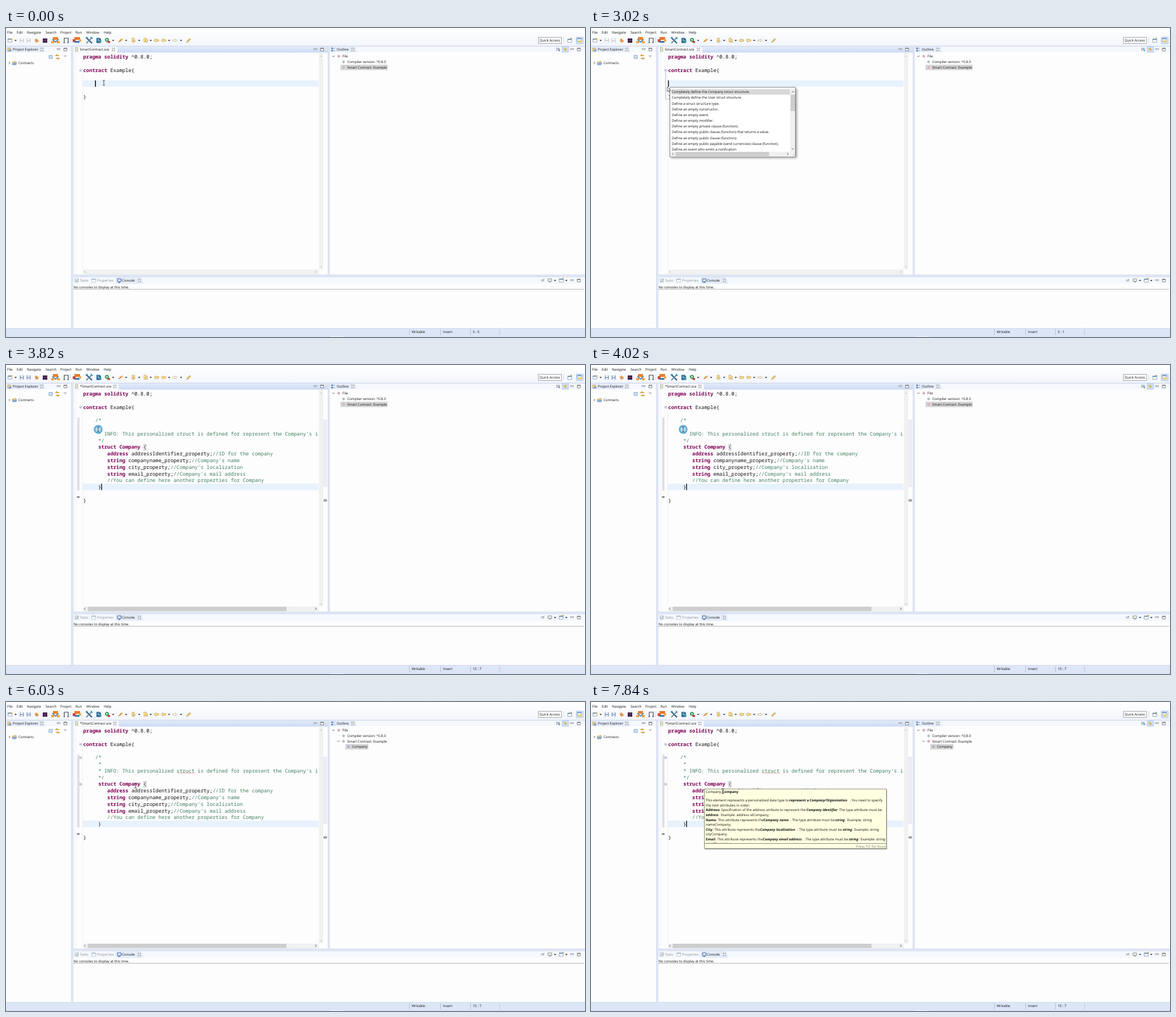
Write an HTML page that moves like this. It is 1024 px wide and 547 px high and loops after 8 s.

```html
<!DOCTYPE html>
<html lang="en">
<head>
<meta charset="utf-8">
<title>Contract editor</title>
<style>
html, body { margin: 0; width: 100%; height: 100%; overflow: hidden; background: #fdfdfd; }
svg { display: block; width: 100vw; height: 100vh; }
text { font: 6.08px "Open Sans", "Noto Sans", sans-serif; fill: #111; white-space: pre; text-rendering: geometricPrecision; }
.code { font: 8.88px "Noto Sans Mono", "DejaVu Sans Mono", monospace; }
.k { font-weight: 700; fill: #7f0055; }
.c { fill: #3f7f5f; }
.b { font-weight: 700; }
.i { font-weight: 700; font-style: italic; }
.grey, .grey text { fill: #8c8f96; }
.ln { fill: none; stroke: #555; stroke-width: .9; }
[data-on] { animation: 8s step-end infinite; }
#ibeam, #arrow { animation: 8s step-end infinite; }
#ibeam { animation-name: beam; }
#arrow { animation-name: point; }
@keyframes beam {
  0% { transform: translate(173px, 97px); }
  17.625% { transform: translate(164px, 98px); }
  20.125% { transform: translate(146px, 98px); }
  22.625% { transform: translate(138px, 99px); }
  47.75% { transform: translate(163px, 114px); }
  55.375% { transform: translate(196px, 131px); }
  57.875% { transform: translate(224px, 148px); }
  60.375% { transform: translate(231px, 148px); }
  75.375% { transform: translate(229px, 148px); }
  95.5% { transform: translate(231px, 153px); }
  98% { transform: translate(233px, 158px); }
}
@keyframes point {
  0% { transform: translate(135px, 104px); }
  40.25% { transform: translate(148px, 108px); }
  42.75% { transform: translate(162px, 113px); }
}
</style>
</head>
<body>
<svg viewBox="0 0 1024 547" preserveAspectRatio="none">
<defs>
  <linearGradient id="bar" x2="0" y2="1"><stop stop-color="#fff"/><stop offset="1" stop-color="#f3f6fc"/></linearGradient>
  <linearGradient id="head" x2="0" y2="1"><stop stop-color="#e3ebfa"/><stop offset="1" stop-color="#cbdaf4"/></linearGradient>
  <filter id="blur" x="-10%" y="-10%" width="120%" height="120%"><feGaussianBlur stdDeviation="2"/></filter>
  <clipPath id="page"><path d="M119 43H552.5V427H119z"/></clipPath>
  <clipPath id="list"><path d="M140 106H352V218.5H140z"/></clipPath>
  <clipPath id="note"><path d="M200 154H522V250H200z"/></clipPath>
  <path id="dd" d="M-2-1H2L0 1.4z" fill="#333"/>
  <path id="min" d="M-2.7-1.6H2.7V.2H-2.7z" fill="#fff" stroke="#777" stroke-width=".7"/>
  <path id="max" d="M-2.7-2.5H2.7V2.5H-2.7zM-2.7-1.4H2.7" fill="#fff" stroke="#666" stroke-width=".8"/>
  <path id="close" d="M-2.6-2.6H-1L0-1 1-2.6H2.6V-1.6L1 0 2.6 1.6V2.6H1L0 1-1 2.6H-2.6V1.6L-1 0-2.6-1.6z" fill="#fff" stroke="#777" stroke-width=".6"/>
  <path id="gem" d="M0-3L3 0 0 3-3 0zM-1.2 0H1.2M0-1.2V1.2" stroke="#fff" stroke-width=".6"/>
  <path id="open" class="ln" d="M-2-1L0 1 2-1"/>
  <g id="fold"><circle r="2.2" fill="#eef2f7" stroke="#9aa9b8" stroke-width=".6"/><path d="M-1.2 0H1.2" stroke="#56708a" stroke-width=".7"/></g>
  <g id="disk"><path d="M-3.6-3.6H3.6V3.6H-3.6z" fill="currentColor"/><path d="M-2-3.6H2V-.8H-2zM-1.6 1H1.6V3.6H-1.6z" fill="#fff"/></g>
  <g id="win"><path d="M-3.6-3H3.6V3H-3.6z" fill="#fdfdfa" stroke="#8296ad" stroke-width=".8"/><path d="M-3.6-3H3.6V-1.3H-3.6z" fill="#6e93c0"/></g>
  <path id="back" d="M-4.2 0L-.8-3V-1.4H4V1.4H-.8V3z" stroke-width=".7"/>
</defs>

<!-- window frame -->
<path fill="#e1e8f7" d="M0 0H1024V547H0z"/>
<path fill="url(#bar)" d="M0 0H1024V31H0z"/>
<g id="menu"></g>

<!-- toolbar -->
<g id="tools">
  <use href="#win" x="7" y="22"/><circle cx="10" cy="19.5" r="1.5" fill="#e8b93c"/>
  <g data-on="0 3820" color="#d0d1d3"><use href="#disk" x="28" y="22"/><use href="#disk" x="40" y="22"/></g>
  <g data-on="3820" color="#8ba3c4"><use href="#disk" x="28" y="22"/><use href="#disk" x="40" y="22"/></g>
  <path d="M51 20L54 18.5 58.5 23 55 26z" fill="#e7a04d"/><path d="M51 20L55 26 52 24z" fill="#b85c2c"/>
  <path d="M65 18.5H73V26H65z" fill="#3b1546"/><path d="M65 22H73M69 18.5V26" stroke="#86628d" stroke-width=".6"/>
  <path d="M83 16H92V21H83z" fill="#e9812c"/><path d="M80 23H85V27H80zM90 23H95V27H90z" fill="#f0a13f"/><path d="M82 20L87.5 25 93 20" fill="none" stroke="#3a6e9c" stroke-width="1.6"/>
  <path d="M103 26V18H110V26M101.5 26H104.5M108 26H111" fill="none" stroke="#39424e" stroke-width="1.2"/>
  <path d="M121 16H131V21H121z" fill="#ea792b"/><path d="M118 20H123V25H118z" fill="#d9422e"/><path d="M121 24.5H130" stroke="#3b75ac" stroke-width="3"/><path d="M129 20H133V24H129z" fill="#f0a642"/>
  <path d="M142 17L152 27" stroke="#315f89" stroke-width="2.4"/><path d="M152 17L142 27" stroke="#718a9b" stroke-width="2"/><path d="M141 18L144 16M150 16L153 19" stroke="#2c9bc4" stroke-width="2"/>
  <path d="M160 17.5H166L168 20V26.5H160z" fill="#23658f"/><path d="M161.5 20H165M161.5 22.5H166" stroke="#d4eef6" stroke-width="1"/><circle cx="167" cy="24" r="2" fill="#39a3a0"/>
  <circle cx="178.5" cy="21" r="3.5" fill="#339b54"/><path d="M177.5 19L180.5 21 177.5 23z" fill="#fff"/><path d="M179.5 23H184V26.5H179.5z" fill="#b84939"/>
  <path d="M199 25L202 20 206 18.5 207 20 203 24z" fill="#efb05a"/><path d="M199 25L203 21" stroke="#a66532"/>
  <g fill="#fae4a0" stroke="#bd953c" stroke-width=".7"><path d="M223 18H227V25H223zM244 18H248V25H244z"/><path d="M225 21L229 23 225 26zM246 23L250 20V26z"/></g>
  <g fill="#fce69b" stroke="#bf8e2c"><use href="#back" x="266" y="22"/><use href="#back" x="278.500" y="22"/></g>
  <use href="#back" transform="translate(299 22) scale(-1 1)" fill="#f5f0dc" stroke="#c9bd94"/>
  <path d="M319 26L321 22 325 18.5 326.500 20 323 24z" fill="#eac454" stroke="#9a8050" stroke-width=".5"/>
  <path d="M114.500 17V27M986.500 17V27" stroke="#b3b8c3" stroke-width=".9" stroke-dasharray="1 1"/>
  <path d="M941.500 16.500H982.500V27.500H941.500z" fill="#fff" stroke="#8d8d8d" stroke-width=".8"/>
  <text x="943.500" y="24.200" fill="#555">Quick Access</text>
  <use href="#win" x="997" y="22.500"/><path d="M998 18.500H1001M999.500 17V20" stroke="#d6a43b"/>
  <path d="M1008.500 16H1021V28H1008.500z" fill="#cfe2f9" stroke="#a4c2e5" stroke-width=".7"/>
  <use href="#win" x="1014" y="21"/><path d="M1012 22H1018V26H1012z" fill="#f0cd70"/>
</g>

<!-- panes -->
<g fill="#fdfdfd" stroke="#ccd5e8" stroke-width=".8">
  <path d="M-1 32.500H115.500V531.500H-1zM118.500 32.500H569.500V437H118.500zM572 32.500H1025V437H572zM118.500 440.500H1025V531.500H118.500z"/>
</g>
<path fill="#f5f8fd" d="M0 33H115V43H0zM572.500 33H1024V43H572.500zM119 441H1024V453H119z"/>
<path fill="#e5edfa" d="M0 33H66L69 43H0zM573 33H617L621 43H573zM194 441H238L243 453H194z"/>
<path fill="url(#head)" d="M119 33H569V43.500H119z"/>
<path data-on="0 3820" d="M119 33H194L197 35V43.500H119z" fill="#fafbfe"/>
<path data-on="3820" d="M119 33H196.500L199.500 35V43.500H119z" fill="#fafbfe"/>

<!-- project tree -->
<path d="M3 35.500H8V41H3z" fill="#f3d281" stroke="#9a8955" stroke-width=".6"/><path d="M5 38H9.500V41.500H5z" fill="#7fa3d3"/>
<text x="12" y="40.200">Project Explorer</text>
<path d="M76 48.500H82V54H76zM77.500 51.200H80.500" fill="#eaf3fd" stroke="#5689bd" stroke-width=".8"/>
<path d="M87 49.500L90 47.500V49H94M95 53L92 55V53.500H88" fill="none" stroke="#c9972f" stroke-width="1.500"/>
<path d="M102.500 49H107L104.700 51.500z" fill="#fff" stroke="#777" stroke-width=".6"/>
<path class="ln" d="M5 60L7 62 5 64"/>
<path d="M11 60H14L15 59H18V65H11z" fill="#f1ce77" stroke="#ad8b43" stroke-width=".5"/><path d="M12.500 61.500H19.500L18 65.500H11z" fill="#79a9dd"/>
<text x="22" y="64.200">Contracts</text>

<!-- outline -->
<path d="M575.500 35H578V37H575.500zM575.500 39H578V41H575.500zM579 36H582M579 40H582" fill="#5b84c2" stroke="#5b84c2" stroke-width=".7"/>
<text x="585" y="40.200">Outline</text>
<path d="M973 36H976M973 39H976M978 35V41L980 39" class="ln"/><path d="M976 37L980 40" stroke="#3d75ba"/>
<path d="M983.500 32.500H995V43H983.500z" fill="#cbdffa" stroke="#9fbfe7" stroke-width=".6"/><path d="M986 36L989 35 992 39 989 41z" fill="#e5b445"/>
<use href="#open" x="579" y="50"/><use href="#gem" x="588.500" y="50" fill="#c38798"/><text x="595" y="52.200">File</text>
<use href="#gem" x="597" y="60" fill="#8da99a"/><text x="603.500" y="62.200">Compiler version: ^0.8.0</text>
<path data-on="0 4430" fill="#d5d5d5" d="M591.500 65H675V74.500H591.500z"/>
<use href="#gem" x="597" y="69.500" fill="#b88f9d"/><text x="603.500" y="71.800">Smart Contract: Example</text>
<g data-on="4430">
  <use href="#open" x="588" y="69.500"/><path fill="#d5d5d5" d="M600 74.500H641V84H600z"/>
  <use href="#gem" x="605.500" y="79" fill="#7e82a8"/><text x="612" y="81.300">Company</text>
</g>

<!-- console -->
<g class="grey">
  <path d="M122 444H128V450H122z" fill="#e4ebf2" stroke="#a0aec0" stroke-width=".7"/><path d="M123 447L125 449 128 444" fill="none" stroke="#8dab91"/>
  <text x="130.500" y="449.200">Tasks</text>
  <use href="#win" x="155" y="447" opacity=".6"/><text x="161" y="449.200">Properties</text>
</g>
<path d="M197 444H203.500V449H197zM198.500 450.500H202" fill="#dbe8fa" stroke="#3f61a0"/><text x="205" y="449.200">Console</text>
<text x="119.500" y="461">No consoles to display at this time.</text>
<path d="M119 462.500H1022" stroke="#a2a2a2" stroke-width=".8"/>
<path d="M946 445H952V449H946z" fill="#c9d1d8"/><path d="M949 447L952 444" stroke="#7f9286"/>
<path d="M958.500 444H965V448.500H958.500zM960 450H964" fill="#edf2d9" stroke="#707a83" stroke-width=".8"/>
<use href="#win" x="982" y="447"/><path d="M984 443.500H987M985.500 442V445" stroke="#d4a443"/>

<!-- status -->
<path fill="#dce6f7" d="M0 532H1024V547H0z"/>
<path fill="#cfdfe9" d="M0 546H1024V547H0z"/><path fill="#f4f8fd" d="M573 546H598V547H573z"/>
<path d="M713.500 533V544M768.500 533V544M821.500 533V544" stroke="#a9b3c5" stroke-width=".8"/>
<path d="M873 534V544" stroke="#b69b86" stroke-width="1" stroke-dasharray="1 1.200"/>
<text x="717.500" y="540.200">Writable</text><text x="773" y="540.200">Insert</text>
<text x="825.500" y="540.200" data-on="0 1810">5 : 5</text>
<text x="825.500" y="540.200" data-on="1810 3820">5 : 1</text>
<text x="825.500" y="540.200" data-on="3820">15 : 7</text>

<!-- editor -->
<path d="M122.500 34.500H127V41.500H122.500z" fill="#fff9dd" stroke="#8c9c88" stroke-width=".7"/><path d="M123.500 37H126M123.500 39H126" stroke="#779d70" stroke-width=".7"/>
<g data-on="0 3820"><text x="130.500" y="40.200">SmartContract.sce</text><use href="#close" x="190" y="38"/></g>
<g data-on="3820"><text x="131" y="40.200">*SmartContract.sce</text><use href="#close" x="192.500" y="38"/></g>
<path d="M119 43.500H125V436H119z" fill="#f8f9fb"/>
<path d="M135.500 44V427" stroke="#ececf0" stroke-width=".8"/>
<path d="M553.500 44H561V427H553.500zM136 427.500H553V436H136z" fill="#f1f1f1"/>
<path d="M555 51L557 49 559 51M555 422L557 424 559 422" class="ln" style="stroke:#bbb"/>
<path d="M140.500 429.500L138.500 431.500 140.500 433.500M547 429.500L549 431.500 547 433.500" class="ln" style="stroke:#aaa"/>
<g data-on="3820">
  <path d="M144.500 428H496V435.500H144.500z" fill="#cdcdcd"/>
  <path d="M140.500 429.500L138.500 431.500 140.500 433.500M547 429.500L549 431.500 547 433.500" class="ln"/>
  <path d="M126 93H130V222H126z" fill="#dedee8"/><path d="M125.500 233.700H130" stroke="#111" stroke-width="1.300"/>
  <path d="M562 97.500H567V215H562z" fill="#f0f0fa" stroke="#d6d6e8" stroke-width=".7"/>
  <path d="M562.300 238.500H567V241H562.300z" fill="#dde" stroke="#444" stroke-width=".8"/>
  <path d="M136 210H552.500V221.600H136z" fill="#e8f2fe"/>
  <path d="M243.300 140.500H248V151H243.300z" fill="none" stroke="#b5b5b5" stroke-width=".8"/>
</g>
<path data-on="0 3820" d="M136 92.700H552.500V104H136z" fill="#e8f2fe"/>
<use href="#fold" x="132" y="75"/>
<g data-on="4430"><use href="#fold" x="132" y="98.500"/><use href="#fold" x="132" y="145.500"/></g>
<path data-on="2820 3220" d="M132 77.500V126H135" fill="none" stroke="#8f9fb0" stroke-width=".8"/>
<g id="top"></g>
<g id="plain" data-on="0 3820"></g>
<g id="filled" data-on="3820" clip-path="url(#page)"></g>
<path data-on="4430" d="M302.500 126q1-1.600 2 0t2 0 2 0 2 0 2 0 2 0 2 0 2 0 2 0 2 0 2 0 2 0 2 0 2 0 2 0 2 0" fill="none" stroke="#e07a68" stroke-width=".7"/>
<g fill="#000">
  <path data-on="0 810 1210 1810" d="M157.500 92.700H159V104H157.500z"/>
  <path data-on="1810 2410 2820 3620" d="M136.300 92.700H137.700V104H136.300z"/>
  <path data-on="3820 4830 5430 6030 6430 7040 7640" d="M168.300 210.200H169.700V221.500H168.300z"/>
</g>

<!-- proposals -->
<g data-on="2820 3820">
  <path d="M141 107H364V230H141z" opacity=".4" filter="url(#blur)"/>
  <path d="M139.500 105H361.500V228H139.500z" fill="#fff" stroke="#777" stroke-width=".9"/>
  <path d="M142 108.300H352V118H142z" fill="#d9d9d9"/>
  <g data-on="3620"><path d="M142 108.300H352V118H142z" fill="#cce8ff"/><path d="M142.300 108.500H284V117.800H142.300z" fill="none" stroke="#5e8fb5" stroke-width=".8"/></g>
  <g id="items" clip-path="url(#list)"></g>
  <path d="M352.500 108H361V219H352.500zM140 219H361V227.500H140z" fill="#f0f0f0"/>
  <path d="M353 118H361V147H353zM149.500 219.500H315V227H149.500z" fill="#cdcdcd"/>
  <path d="M355 114L357 112 359 114M355 213L357 215 359 213M145.500 221L143.500 223 145.500 225M347 221L349 223 347 225" class="ln"/>
  <path d="M360 222L356 226M360 225L359 226" stroke="#bbb" stroke-width=".7"/>
</g>

<!-- hover note -->
<g data-on="6430">
  <path d="M202 156H523.500V261H202z" opacity=".35"/>
  <path d="M200.500 154H522.500V259.500H200.500zM200.500 250.500H522.500" fill="#ffffe1" stroke="#6d6d60" stroke-width=".8"/>
  <g id="tip" clip-path="url(#note)"></g>
  <text x="521.500" y="258" text-anchor="end" style="fill:#777">Press 'F2' for focus</text>
</g>

<!-- pointers -->
<g data-on="0 2820 3820"><g id="ibeam">
  <g data-on="3820 4220"><circle r="6.700" fill="#8cc6e8" stroke="#5aa7d6" stroke-width="2"/><circle r="4" fill="#b9dff2"/></g>
  <path d="M-2-4.200H-.6L0-3.700.6-4.200H2M0-3.700V3.700M-2 4.200H-.6L0 3.700.6 4.200H2" fill="none" stroke="#333" stroke-width=".9"/>
</g></g>
<g data-on="2820 3820"><path id="arrow" d="M0 0V8.500L2 6.700 3.400 9.700 4.800 9 3.500 6.200H6z" fill="#fff" stroke="#222" stroke-width=".7"/></g>
</svg>
<script>
const LOOP = 8000;
const $ = id => document.getElementById(id);
const add = (id, html) => $(id).insertAdjacentHTML('beforeend', html);
const text = (x, y, s, cls = '') => `<text x="${x}" y="${y}" class="${cls}">${s}</text>`;
const use = (id, x, y) => `<use href="#${id}" x="${x}" y="${y}"/>`;

// Menu bar: dimmed while the proposal list has focus
const menu = [['File', 2], ['Edit', 19], ['Navigate', 37], ['Search', 70], ['Project', 96], ['Run', 123], ['Window', 142], ['Help', 173]];
const bar = menu.map(([s, x]) => text(x, 10.2, s)).join('');
add('menu', `<g data-on="0 3620 3820">${bar}</g><g class="grey" data-on="3620 3820">${bar}</g>`);

add('tools', [17, 189.5, 212.5, 235.5, 256, 288.5, 309.5].map(x => use('dd', x, 22)).join(''));
const controls = [[93, 105, 38], [547, 559, 38], [1001, 1013, 38], [1001, 1013, 447]]
  .map(([a, b, y]) => use('min', a, y) + use('max', b, y)).join('');
const closers = use('close', 63.5, 38) + use('close', 613.5, 38) + use('close', 236, 447);
add('top', controls + closers + use('dd', 971, 447) + use('dd', 991, 447));

// Source code, coloured by keyword and comment
const words = /\b(pragma solidity|contract|struct Company|address|string)\b/g;
function code(id, row, lines) {
  lines.forEach((s, n) => {
    const [, body, note = ''] = s.match(/^(.*?)(\/\/.*|\/?\*.*)?$/);
    const html = body.replace(words, '<tspan class="k">$1</tspan>') + `<tspan class="c">${note}</tspan>`;
    add(id, text(136.5, 54.2 + (row + n) * 11.78, html, 'code'));
  });
}
code('top', 0, ['pragma solidity ^0.8.0;', '', 'contract Example{']);
code('plain', 6, ['}']);
code('filled', 4, [
  '    /*',
  '     *',
  "     * INFO: This personalized struct is defined for represent the Company's i",
  '     */',
  '     struct Company {',
  '        address addressIdentifier_property;//ID for the company',
  "        string companyname_property;//Company's name",
  "        string city_property;//Company's localization",
  "        string email_property;//Company's mail address",
  '        //You can define here another properties for Company',
  '     }',
  '',
  '}'
]);

[
  'Completely define the Company struct structure.',
  'Completely define the User struct structure.',
  'Define a struct structure type.',
  'Define an empty constructor.',
  'Define an empty event.',
  'Define an empty modifier.',
  'Define an empty private clause (function).',
  'Define an empty public clause (function) that returns a value.',
  'Define an empty public clause (function).',
  'Define an empty public payable (send currencies) clause (function).',
  'Define an event who emits a notification'
].forEach((s, n) => add('items', text(143, 115.3 + n * 10.15, s)));

// Hover text: each run is [x, text, style]
const field = (name, x1, what, x2, x3, x4, x5) => [
  [203, name, 'b'], [x1, ': This attribute represents the'], [x2, what, 'i'],
  [x3, '. The type attribute must be'], [x4, 'string', 'i'], [x5, '. Example: string']
];
[
  [[203, 'This element represents a personalized data type to'], [350.5, 'represent a', 'b'], [386.5, 'Company/Organization', 'i'], [457.5, '. You need to specify']],
  [[203, 'the next attributes in order:']],
  [[203, 'Address', 'b'], [227, ': Specification of the address atribute to represent the'], [381, 'Company identifier', 'i'], [439, 'The type attribute must be']],
  [[203, 'address', 'i'], [226.5, '. Example: address idCompany;']],
  field('Name', 221.5, 'Company name', 305, 352.5, 432, 450),
  [[203, 'nameCompany;']],
  field('City', 215, 'Company localization', 299, 365, 445, 462.5),
  [[203, 'cityCompany;']],
  field('Email', 220, 'Company email address', 304, 376, 456, 473.5),
  [[203, 'emailCompany;']]
].forEach((runs, n) => runs.forEach(([x, s, cls]) => add('tip', text(x, 176.3 + n * 8.56, s, cls))));
add('tip', text(203, 161.4, 'Company.') + text(232, 161.4, 'Company', 'b'));

// data-on lists the moments (ms) at which a part turns on, off, on ...
const rules = new Map();
document.querySelectorAll('[data-on]').forEach(el => {
  const key = el.dataset.on;
  if (!rules.has(key)) rules.set(key, 'on' + rules.size);
  el.style.animationName = rules.get(key);
});
const css = [...rules].map(([key, name]) => {
  const steps = key.split(' ').map((ms, n) => `${ms / LOOP * 100}% { opacity: ${1 - n % 2}; }`);
  if (!key.startsWith('0 ')) steps.unshift('0% { opacity: 0; }');
  return `@keyframes ${name} { ${steps.join(' ')} }`;
});
document.head.appendChild(document.createElement('style')).textContent = css.join('\n');
</script>
</body>
</html>
```
